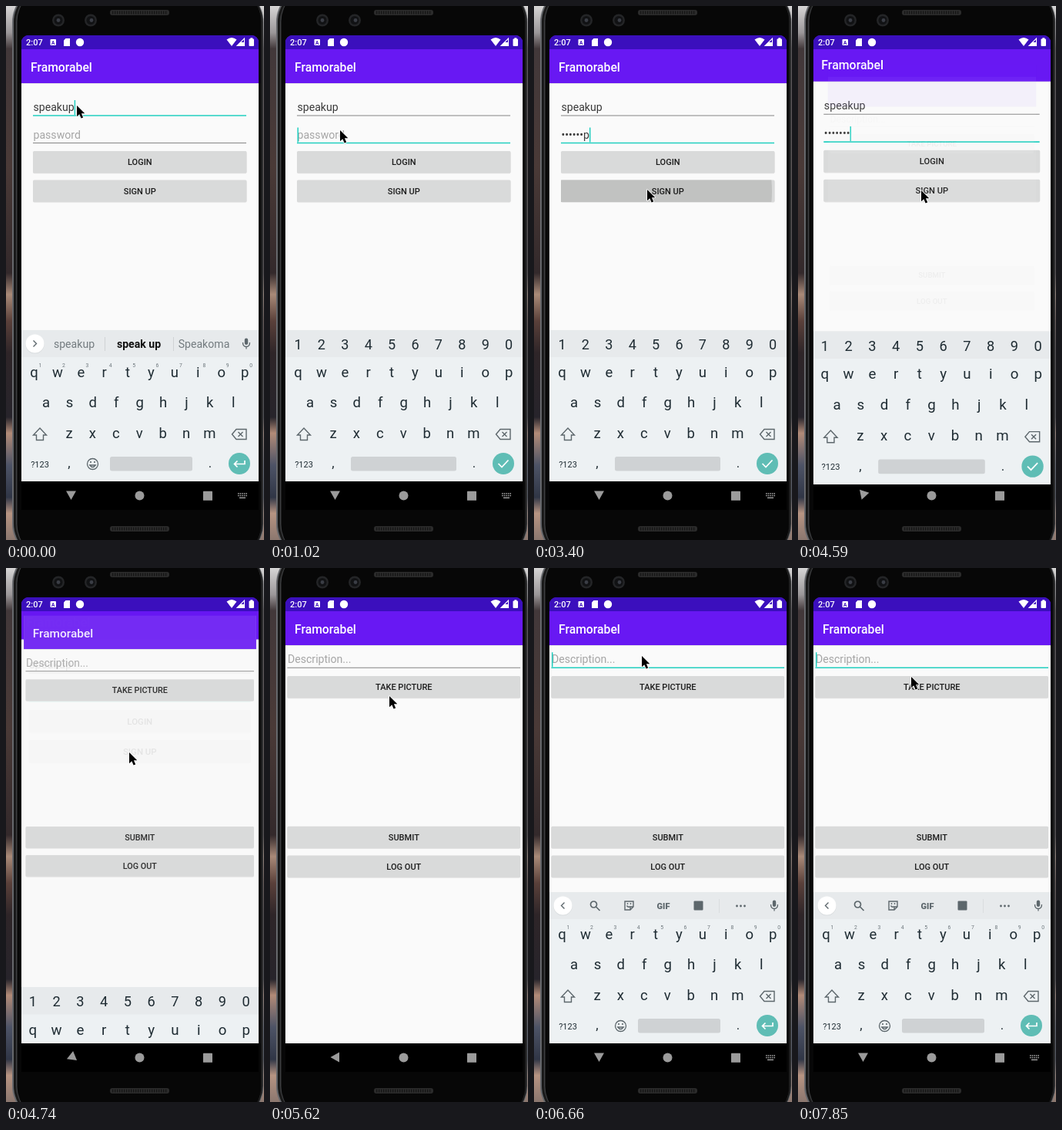
Recreate the animation shown at these times as an HTML page with a canvas. Size 335 by 692 pixels, loop 8 s.

```html
<!DOCTYPE html>
<html lang="en">
<head>
<meta charset="utf-8">
<title>Sign-up demo</title>
<style>
  html, body { margin: 0; width: 100%; height: 100%; overflow: hidden; background: #0a0a0a; }
  canvas { display: block; width: 335px; height: 692px; }
</style>
</head>
<body>
<canvas id="stage"></canvas>
<script>
const LOOP = 8000, W = 335, H = 692;
const TEAL = '#22cfc0', KEY = '#1f2c33', ICON = '#5d676c', NAV = '#9b9b9b';
const USER = 'speakup', APP = 'Framorabel';
const canvas = document.getElementById('stage');
const ctx = canvas.getContext('2d');
const ratio = window.devicePixelRatio || 1;
canvas.width = W * ratio;
canvas.height = H * ratio;

// Held values: [start time, ...values]
const pointerSteps = [
  [0, 92, 129], [590, 92, 145], [740, 91, 161],
  [2810, 100, 172], [2960, 125, 206], [3110, 145, 235], [3250, 147, 238],
  [3700, 153, 239], [3850, 160, 239],
  [5330, 158, 200], [5480, 149, 137], [5620, 155, 166],
  [5910, 147, 140], [6060, 140, 114], [7850, 147, 141]
];
const typedSteps = [[0, 0], [1470, 1], [1620, 2], [1770, 3], [1910, 5], [2060, 6], [2210, 7]];
const caretSteps = [
  [0, 1], [290, 0], [590, 1], [2810, 0], [3250, 1], [3850, 0], [4290, 1], [6960, 0], [7410, 1]
];
const rippleSteps = [ // radius, opacity
  [0, 0, 0], [3250, 70, 1], [3400, 160, 1], [3550, 160, .65], [3700, 160, .3], [3850, 0, 0]
];
const openSteps = [ // old scale, new scale, new opacity
  [0, 1, .85, 0], [4590, 1.012, .878, .045], [4730, 1.04, .98, .9], [4880, 1, 1, 1]
];
const keyboardSteps = [ // downward shift, back-arrow turn
  [0, 0, 1], [4590, 0, .8], [4730, 120, .25], [4880, 200, 0], [6510, 45, .6], [6660, 0, 1]
];

function at(steps, t) {
  let found = steps[0];
  for (const step of steps) if (step[0] <= t) found = step;
  return found.slice(1);
}

function rect(x, y, w, h, color, radius = 0) {
  ctx.fillStyle = color;
  ctx.beginPath();
  ctx.roundRect(x, y, w, h, radius);
  ctx.fill();
}

function disc(x, y, r, color) {
  ctx.fillStyle = color;
  ctx.beginPath();
  ctx.arc(x, y, r, 0, 7);
  ctx.fill();
}

function text(str, x, y, size, color, align = 'left', weight = 400) {
  ctx.font = `${weight} ${size}px Roboto, sans-serif`;
  ctx.textAlign = align;
  ctx.fillStyle = color;
  ctx.fillText(str, x, y);
}

// Draws SVG path data with its origin at x, y.
function shape(d, x, y, fill, stroke, width = 1.4) {
  const path = new Path2D(d);
  ctx.save();
  ctx.translate(x, y);
  if (fill) { ctx.fillStyle = fill; ctx.fill(path); }
  if (stroke) { ctx.strokeStyle = stroke; ctx.lineWidth = width; ctx.stroke(path); }
  ctx.restore();
}

function scaled(scale, cy, draw) {
  ctx.save();
  ctx.translate(174, cy);
  ctx.scale(scale, scale);
  ctx.translate(-174, -cy);
  draw();
  ctx.restore();
}

function button(label, x, y, w, h = 28.5) {
  rect(x, y + .8, w, h, '#e3e3e3', 2);
  rect(x, y, w, h, '#d9dada', 1.5);
  return () => text(label, 173.8, y + h / 2 + 4, 11, '#1c1c1c', 'center', 500);
}

function field(x, right, y, value, hint, focused, caret) {
  text(value || hint, x + .5, y, 14.1, value ? '#3a3a3a' : '#a5a5a5');
  rect(x, y + (focused ? 5.2 : 5.6), right - x, focused ? 1.6 : 1, focused ? TEAL : '#858585');
  if (focused && caret) rect(x + .5 + (value ? ctx.measureText(value).width : 0), y - 14, 1.5, 19, TEAL);
}

function appFrame() {
  rect(20, 56, 308, 560, '#fafafa');
  rect(20, 99.5, 308, 1.5, '#e4e4e6');
  rect(20, 38, 308, 62, '#6818f3');
  text(APP, 32, 84.5, 15.7, '#fff', 'left', 500);
}

function loginScreen(t) {
  const [caret] = at(caretSteps, t), [count] = at(typedSteps, t);
  const [radius, opacity] = at(rippleSteps, t);
  const onPassword = t >= 880;
  const masked = t >= 3700 ? count : count - 1;
  const password = count ? '•'.repeat(masked) + USER.slice(masked, count) : '';
  appFrame();
  field(35, 312, 136, USER, '', !onPassword, caret);
  field(35, 312, 171.5, password, 'password', onPassword, caret);
  button('LOGIN', 35, 188, 277.5)();
  const label = button('SIGN UP', 35, 225.5, 277.5);
  if (radius) {
    ctx.save();
    ctx.globalAlpha *= opacity;
    ctx.beginPath();
    ctx.rect(35, 225.5, 277.5, 28.5);
    ctx.clip();
    disc(149, 240, radius, '#c1c2c1');
    ctx.restore();
  }
  label();
}

function composeScreen(t) {
  appFrame();
  field(22.5, 325, 123.2, '', 'Description...', t >= 6360, at(caretSteps, t)[0]);
  button('TAKE PICTURE', 22.5, 140, 302.5)();
  button('SUBMIT', 22.5, 334.7, 302.5)();
  button('LOG OUT', 22.5, 372.4, 302.5)();
}

function microphone(x, y) {
  rect(x - 2.2, y - 7, 4.4, 8.5, ICON, 2.2);
  shape('M-4.5-1.5Q-4.5 4 0 4T4.5-1.5M0 4V7', x, y, null, ICON, 1.3);
}

function suggestions() {
  shape('M-2-4 2 0-2 4', 37.5, 437.5, null, ICON);
  text(USER, 88.5, 443, 14.1, '#737b7f', 'center');
  text('speak up', 172.5, 443, 14.1, '#111', 'center', 700);
  text('Speakoma', 257, 443, 14.1, '#737b7f', 'center');
  rect(128, 429, 1, 18, '#cfd3d5');
  rect(217, 429, 1, 18, '#cfd3d5');
}

function toolStrip() {
  shape('M2-4 -2 0 2 4', 37.5, 437.5, null, ICON);
  shape('M2.5-1.5A4 4 0 1 1-5.5-1.5 4 4 0 1 1 2.5-1.5M1.5 1.5 6.5 6.5', 79, 437.5, null, ICON, 1.7);
  shape('M-5.5-5.5H5.5V1.5L1.5 5.5H-5.5ZM1.5 5.5V1.5H5.5M-3 0Q-1 3 1 1', 123.5, 437.5, null, ICON);
  disc(121.5, 435, .9, ICON);
  disc(125.5, 435, .9, ICON);
  text('GIF', 168, 441.5, 11, ICON, 'center', 900);
  rect(207.5, 431.5, 12, 12, ICON, 1);
  rect(240, 429, 1, 18, '#d9dddf');
  for (const x of [263.5, 268.5, 273.5]) disc(x, 438, 1.4, ICON);
}

function keyRow(chars, x, y, size = 18.5) {
  [...chars].forEach((c, i) => text(c, x + i * 30.4, y, size, KEY, 'center'));
}

function keyboard(numeric, tools) {
  rect(20, 420, 308, 196, '#edf1f3');
  rect(20, 420, 308, 35, '#e7eaec');
  if (numeric) {
    keyRow('1234567890', 36.5, 445, 18);
  } else {
    disc(37.5, 438.3, 12.2, '#d8dcde');
    disc(37.5, 437.5, 12, '#fff');
    tools ? toolStrip() : suggestions();
    microphone(312, 437.5);
    [...'1234567890'].forEach((c, i) => text(c, 44.5 + i * 30.4, 468, 6.8, '#6d777c', 'center'));
  }
  keyRow('qwertyuiop', 36.5, 481);
  keyRow('asdfghjkl', 52, 520);
  keyRow('zxcvbnm', 82, 560);
  shape('M0-8 8.5 1H4.5V7.5H-4.5V1H-8.5Z', 44, 555, null, ICON);
  shape('M-9.5 0-4-6.5H9V6.5H-4ZM-1.5-3 4.5 3M4.5-3-1.5 3', 303, 555, null, ICON);
  text('?123', 44, 597.5, 11, KEY, 'center');
  text(',', 82, 598, 17, KEY, 'center');
  text('.', 265, 598, 17, KEY, 'center');
  if (!numeric) {
    shape('M7 0A7 7 0 1 1-7 0 7 7 0 1 1 7 0M-3.7 1.5Q0 6.5 3.7 1.5Z', 112.5, 593.5, null, ICON, 1.3);
    disc(110, 591, 1.1, ICON);
    disc(115, 591, 1.1, ICON);
  }
  const left = numeric ? 105 : 135;
  rect(left, 584, 242 - left, 18.5, '#cfd2d4', 2.5);
  disc(303, 593, 14, '#5fbdb5');
  shape(numeric ? 'M-6.5 0-2 4.5 6.5-4.5' : 'M7-4V0.5H-6.5M-2.5-3.5-6.5.5-2.5 4.5', 303, 593, null, '#fff', 1.7);
}

function statusBar() {
  rect(20, 38, 308, 18, '#3b0fbd', [9, 9, 0, 0]);
  text('2:07', 26, 51, 11, '#fff', 'left', 500);
  rect(57.5, 43, 7.5, 8, '#fff', 1);
  text('A', 61.2, 49.6, 6.5, '#3b0fbd', 'center', 700);
  shape('M-1.5-5H4V5H-4V-2.5Z', 79, 47, '#fff');
  disc(96, 47, 5.2, '#fff');
  shape('M-6.5-3.5Q0-8.5 6.5-3.5L0 5Z', 293, 47, '#fff');
  shape('M4.5-5V4.5H-5Z', 305, 47, null, '#fff', 1.1);
  shape('M4.5 0V4.5H-5L-.5 0Z', 305, 47, '#fff');
  rect(315.5, 42.5, 6.5, 9.5, '#fff', 1);
  rect(317.3, 41.3, 3, 2, '#fff');
}

function navIcons(turn, keyboardIcon) {
  ctx.save();
  ctx.translate(84.5, 634);
  ctx.rotate(-turn * Math.PI / 2);
  shape('M-6 0 5.5-6.5V6.5Z', 0, 0, NAV);
  ctx.restore();
  disc(173.5, 634.5, 6, NAV);
  rect(256, 628.7, 12, 12, NAV, .5);
  if (!keyboardIcon) return;
  for (let row = 0; row < 2; row++)
    for (let i = 0; i < 5; i++) rect(301 + i * 2.6, 631 + row * 2.7, 1.6, 1.6, NAV);
  rect(303, 636.6, 8, 1.5, NAV);
}

function speaker(y) {
  rect(135, y, 77, 7, '#2b2b2b', 3);
  for (let x = 138; x < 210; x += 3) rect(x, y + 1.5, 1.3, 4, '#151515');
}

function phone() {
  const wall = ctx.createLinearGradient(0, 0, 0, H);
  [[0, '#d6d5d5'], [.05, '#9b9799'], [.08, '#42383a'], [.3, '#4a3a37'], [.5, '#33292b'], [.54, '#a98a78'],
   [.59, '#5a403a'], [.65, '#2e2528'], [.77, '#27242b'], [.8, '#b28b78'], [.86, '#4d5366'], [.92, '#303646'],
   [.95, '#b79482'], [1, '#8b776f']].forEach(([stop, color]) => wall.addColorStop(stop, color));
  ctx.fillStyle = wall;
  ctx.fillRect(0, 0, W, H);
  rect(8, -25, 326.5, 742, '#66686c', 46);
  rect(10, -24, 323.5, 740, '#191919', 45);
  rect(13, -22, 319, 736, '#3e3f41', 43);
  rect(14.5, -22, 317, 736, '#070707', 42);
  speaker(5);
  speaker(674);
  for (const x of [68, 110]) {
    disc(x, 18.5, 8, '#242527');
    disc(x, 18.5, 5.5, '#111214');
    disc(x + (x < 90 ? 0 : 1), 18.5, 2.4, '#3a3d45');
  }
}

function pointer(x, y) {
  ctx.lineJoin = 'round';
  shape('M0 0V14.3L3.3 11.2 5.6 16.6 8.2 15.5 5.9 10.3H10.3Z', x, y, '#000', '#fff', 1.6);
  shape('M0 0V14.3L3.3 11.2 5.6 16.6 8.2 15.5 5.9 10.3H10.3Z', x, y, '#000');
  ctx.lineJoin = 'miter';
}

function draw(t) {
  const [oldScale, newScale, newOpacity] = at(openSteps, t);
  const [shift, turn] = at(keyboardSteps, t);
  const composing = t >= 4880;
  ctx.setTransform(ratio, 0, 0, ratio, 0, 0);
  phone();
  rect(20, 616, 308, 37, '#000');

  ctx.save();
  ctx.beginPath();
  ctx.roundRect(20, 38, 308, 582, [9, 9, 0, 0]);
  ctx.clip();
  const keys = () => {
    ctx.translate(0, shift);
    keyboard(t >= 1020 && !composing, composing);
  };
  if (!composing) scaled(oldScale, 290, () => loginScreen(t));
  if (newOpacity) {
    ctx.globalAlpha = newOpacity;
    scaled(newScale, 349, () => composeScreen(t));
    ctx.globalAlpha = 1;
  }
  if (shift < 200) scaled(composing ? 1 : Math.min(oldScale, 1.012), 290, keys);
  ctx.restore();

  if (shift) rect(20, 616, 308, 37, '#000');
  statusBar();
  navIcons(turn, turn === 1);
  pointer(...at(pointerSteps, t));
}

function tick(now) {
  draw(now % LOOP);
  requestAnimationFrame(tick);
}
requestAnimationFrame(tick);
</script>
</body>
</html>
```
